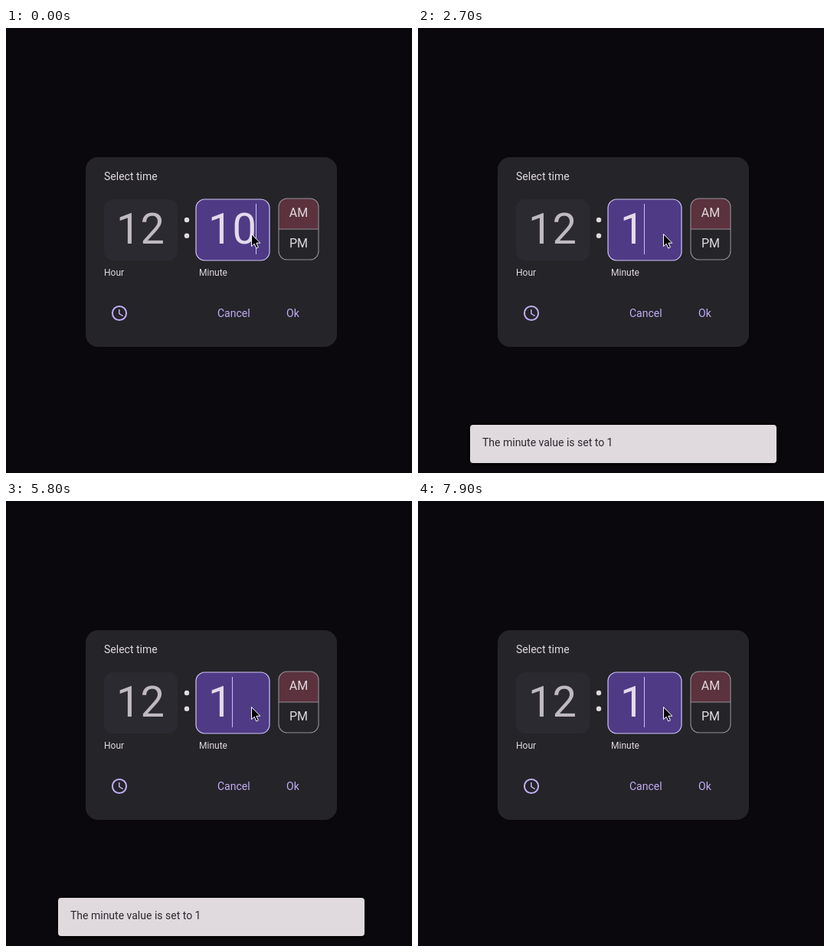
An HTML page for the animation above (8 s loop, 530 px wide and 582 px high).

```html
<!DOCTYPE html>
<html lang="en">
<head>
<meta charset="utf-8">
<title>Time picker</title>
<style>
  html, body { margin: 0; width: 100%; height: 100%; overflow: hidden; background: #0a080c; }
  svg { display: block; width: 530px; height: 582px; font: 14px Roboto, sans-serif; fill: #e0dade; }
  .digits { font-size: 56px; }
  .label { font-size: 12px; }
  .period { font-size: 16px; text-anchor: middle; }
  .action { fill: #c2aef3; }
</style>
</head>
<body>
<svg viewBox="0 0 530 582">
  <defs>
    <filter id="blur" x="-10%" y="-50%" width="120%" height="200%"><feGaussianBlur stdDeviation="2"/></filter>
    <clipPath id="periodShape"><rect x="356" y="223" width="52" height="80" rx="11"/></clipPath>
  </defs>

  <rect x="104" y="169" width="328" height="248" rx="16" fill="#252429"/>
  <text x="128" y="199">Select time</text>

  <rect x="128" y="224" width="96" height="80" rx="12" fill="#2c2a31"/>
  <text class="digits" x="144" y="282" fill="#bfb9c1">12</text>
  <circle cx="236" cy="251" r="3.2"/>
  <circle cx="236" cy="271.7" r="3.2"/>

  <rect x="248" y="224" width="96" height="80" rx="11.5" fill="#4f3a86" stroke="#d2c3f8" stroke-width="1.2"/>
  <text class="digits" id="minute" x="264" y="282" fill="#e3daea">10</text>
  <rect id="caret" y="230" width="1" height="66" fill="#d0bcff"/>

  <rect x="356" y="223" width="52" height="40" fill="#5b323d" clip-path="url(#periodShape)"/>
  <g fill="none" stroke="#938f96" stroke-width="1.1">
    <rect x="356" y="223" width="52" height="80" rx="11"/>
    <path d="M356 263H408"/>
  </g>
  <text class="period" x="382" y="247">AM</text>
  <text class="period" x="382" y="287">PM</text>

  <text class="label" x="128" y="324">Hour</text>
  <text class="label" x="252" y="324">Minute</text>

  <g class="action">
    <circle cx="148" cy="373" r="9.1" fill="none" stroke="#c2aef3" stroke-width="2"/>
    <path d="M147 368h1.5v5.25l4.5 2.67-.75 1.23L147 374z"/>
    <text x="276" y="378">Cancel</text>
    <text x="366" y="378">Ok</text>
  </g>

  <path d="M320.5 269.5V285.6L324.2 282.2 326.8 288 329.4 286.9 326.9 281.2H331.8Z"
        fill="#000" stroke="#fff" stroke-width="1"/>

  <g id="snackbar">
    <rect id="shadow" x="67" width="402" rx="5" fill="#000" filter="url(#blur)"/>
    <rect id="panel" x="68" width="400" rx="4" fill="#e0dade"/>
    <text id="message" x="84" fill="#2b292e">The minute value is set to 1</text>
  </g>
</svg>
<script>
  const LOOP = 8000, DELETE_AT = 1750;
  const SHOW_AT = 1920, HIDE_AT = 6182, SLIDE = 300;
  const BLINK = 1020;
  const el = id => document.getElementById(id);
  const set = (id, attrs) => {
    for (const name in attrs) el(id).setAttribute(name, attrs[name]);
  };

  const outCirc = x => {
    const p = Math.min(Math.max(x, 0), 1) - 1;
    return Math.sqrt(1 - p * p);
  };

  // Deleting a digit restarts the caret's blink.
  function caretVisible(t) {
    const start = t < DELETE_AT ? -130 : 1675;
    return (t - start) % BLINK < BLINK / 2;
  }

  function draw(t) {
    const deleted = t >= DELETE_AT;
    el("minute").textContent = deleted ? "1" : "10";
    set("caret", { x: deleted ? 295 : 326, opacity: caretVisible(t) ? 1 : 0 });

    const shown = outCirc((t - SHOW_AT) / SLIDE) - outCirc((t - HIDE_AT) / SLIDE);
    const height = 50 * Math.max(shown, 0), top = 569 - height;
    set("snackbar", { opacity: shown });
    set("panel", { y: top, height });
    set("shadow", { y: top - 1, height: height + 3 });
    set("message", { y: top + 28 });
  }

  function tick() {
    draw(performance.now() % LOOP);
    requestAnimationFrame(tick);
  }
  tick();
</script>
</body>
</html>
```
